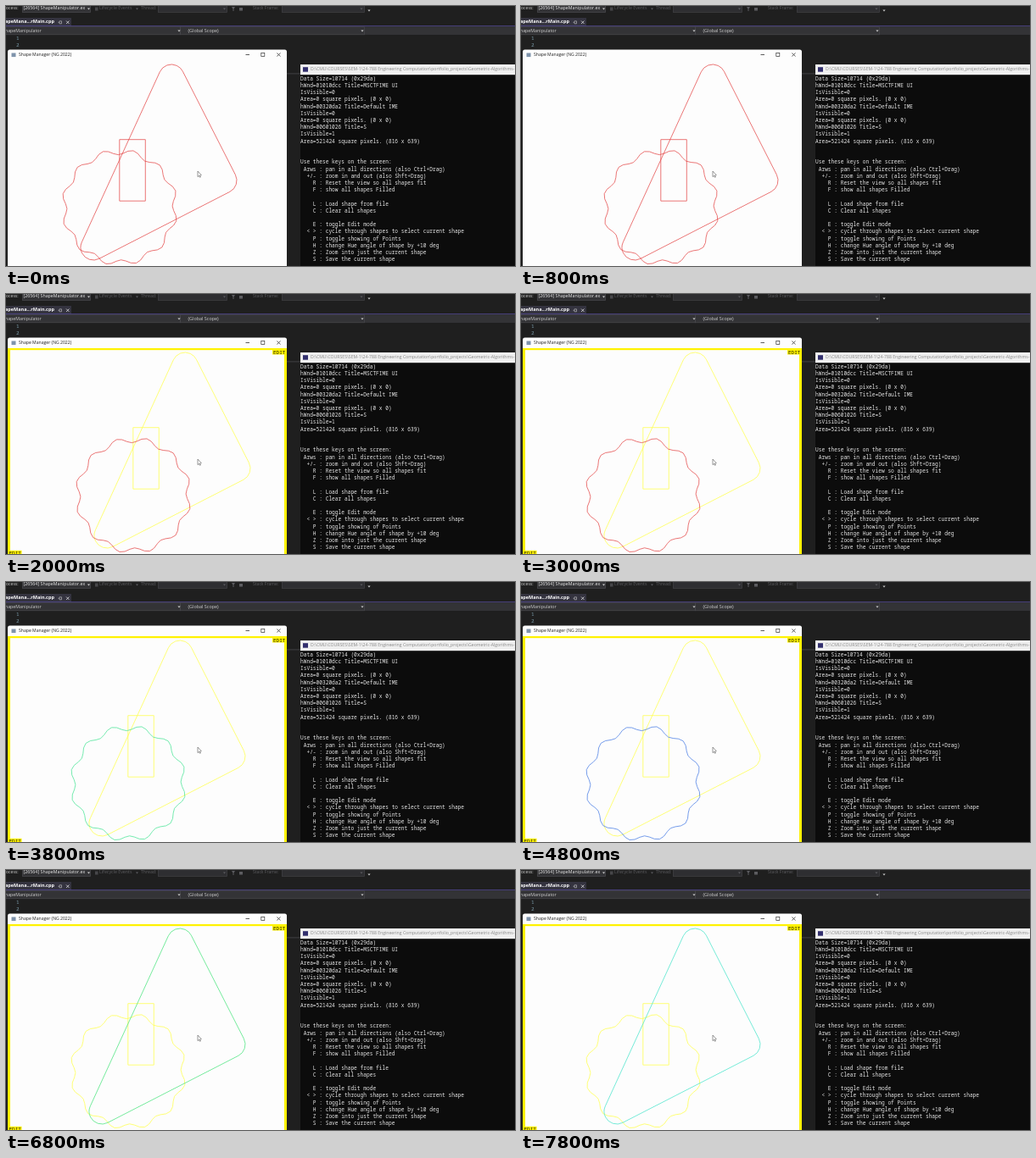
Animation, 600 px wide and 307 px high, one loop 8000 ms. Source, as an HTML page with a canvas:

```html
<!DOCTYPE html>
<html lang="en">
<head>
<meta charset="utf-8">
<title>Shape Manager</title>
<style>
html, body { margin: 0; width: 100%; height: 100%; overflow: hidden; background: #1f1f1f; }
canvas { display: block; width: 600px; height: 307px; }
</style>
</head>
<body>
<canvas id="stage" width="600" height="307"></canvas>
<script>
const LOOP = 8000, STEP = 200;
const SANS = '"Open Sans", "Noto Sans", sans-serif';
const MONO = '"Noto Sans Mono", "DejaVu Sans Mono", monospace';
const ctx = document.getElementById('stage').getContext('2d');

const consoleLines = [
  'Data Size=10714 (0x29da)',
  'hWnd=01010dcc Title=MSCTFIME UI',
  'IsVisible=0',
  'Area=0 square pixels. (0 x 0)',
  'hWnd=00320da2 Title=Default IME',
  'IsVisible=0',
  'Area=0 square pixels. (0 x 0)',
  'hWnd=00601026 Title=S',
  'IsVisible=1',
  'Area=521424 square pixels. (816 x 639)',
  '', '',
  'Use these keys on the screen:',
  ' Arws : pan in all directions (also Ctrl+Drag)',
  '  +/- : zoom in and out (also Shft+Drag)',
  '    R : Reset the view so all shapes fit',
  '    F : show all shapes Filled',
  '',
  '    L : Load shape from file',
  '    C : Clear all shapes',
  '',
  '    E : toggle Edit mode',
  '  < > : cycle through shapes to select current shape',
  '    P : toggle showing of Points',
  '    H : change Hue angle of shape by +10 deg',
  '    Z : Zoom into just the current shape',
  '    S : Save the current shape'
];

// [time, value] pairs, linear between them
const panKeys = [[0, 0], [600, 31], [800, 31], [1400, 16], [2200, 16], [2800, 10]];
const gearHueKeys = [[3000, 0], [4200, 222]];
const triHueKeys = [[5400, 0], [6600, 140], [6800, 140], [7800, 170]];
const EDIT_AT = 1200, TRIANGLE_AT = 5000;

function valueAt(keys, t) {
  if (t <= keys[0][0]) return keys[0][1];
  for (let i = 1; i < keys.length; i++) {
    const [t0, v0] = keys[i - 1], [t1, v1] = keys[i];
    if (t <= t1) return v0 + (v1 - v0) * (t - t0) / (t1 - t0);
  }
  return keys[keys.length - 1][1];
}

function box(x, y, w, h, fill) {
  ctx.fillStyle = fill;
  ctx.fillRect(x, y, w, h);
}

function frame(x, y, w, h, color) {
  ctx.strokeStyle = color;
  ctx.lineWidth = 0.7;
  ctx.strokeRect(x, y, w, h);
}

function label(text, x, y, size, color, family = SANS, weight = '') {
  ctx.font = `${weight} ${size}px ${family}`;
  ctx.fillStyle = color;
  ctx.textBaseline = 'middle';
  ctx.fillText(text, x, y);
}

function poly(points, stroke, fill, width = 0.8) {
  ctx.beginPath();
  points.forEach(([x, y]) => ctx.lineTo(x, y));
  if (fill) {
    ctx.closePath();
    ctx.fillStyle = fill;
    ctx.fill();
  }
  if (stroke) {
    ctx.strokeStyle = stroke;
    ctx.lineWidth = width;
    ctx.stroke();
  }
}

const caret = (x, y, color) => poly([[x - 1.6, y - 1], [x + 1.6, y - 1], [x, y + 1]], null, color);

function drawEditor() {
  const dim = '#5c5c60', text = '#d0d0d0';
  box(0, 0, 600, 307, '#1f1f1f');

  label('Process:', -5, 3, 5.1, text);
  box(19, -1, 81, 8.6, '#333336');
  frame(19.5, -1, 80, 8.6, '#48484c');
  label('[26564] ShapeManipulator.ex', 20.5, 3, 5.3, '#ececec');
  caret(97.5, 3.5, text);
  box(105, 1.5, 3.5, 4, '#47474a');
  label('Lifecycle Events', 110, 3, 5.3, dim);
  caret(154.5, 3.5, dim);
  label('Thread:', 159, 3, 5.2, dim);
  box(179, -1, 82, 8.6, '#2e2e31');
  frame(179.5, -1, 81, 8.6, '#404044');
  caret(257.5, 3.5, dim);
  poly([[266, 1], [270, 1], [268.5, 3.5], [268.5, 6], [267.5, 6], [267.5, 3.5]], null, dim);
  box(275, 2, 4, 3.5, dim);
  label('Stack Frame:', 291, 3, 5.1, dim);
  box(325, -1, 98, 8.6, '#2e2e31');
  frame(325.5, -1, 97, 8.6, '#404044');
  caret(419, 3.5, dim);
  caret(428, 5.5, text);

  box(0, 14, 77, 10, '#34333f');
  box(0, 23.2, 600, 1, '#51488f');
  label('apeMana...rMain.cpp', -1, 19, 5.5, '#ffffff', SANS, 'bold');
  poly([[61.5, 19.3], [63, 19.3], [63, 17.8], [65.5, 17.8], [65.5, 20.8], [63, 20.8], [63, 19.3]], '#c8c8c8', null, 0.6);
  poly([[71, 17.5], [74.5, 21]], '#dddddd');
  poly([[74.5, 17.5], [71, 21]], '#dddddd');

  box(0, 24.2, 600, 9.8, '#333336');
  frame(-1, 24.8, 206.5, 9, '#48484c');
  frame(205.5, 24.8, 217, 9, '#48484c');
  label('ShapeManipulator', -4, 29.4, 5.3, text);
  caret(204, 29.6, text);
  label('(Global Scope)', 214.5, 29.4, 5.45, text);
  caret(420, 29.6, text);
  label('1', 12, 38.5, 6, '#7d9fae', MONO);
  label('2', 12, 46.3, 6, '#7d9fae', MONO);
  box(331, 79.5, 16, 0.8, '#48484c');
}

function drawConsole() {
  box(347, 69, 253, 238, '#0c0c0c');
  box(347, 69, 253, 12.2, '#f0f0f0');
  box(350, 72.2, 6, 5.5, '#322f6e');
  label('D:\\CMU\\COURSES\\SEM-1\\24-788 Engineering Computation\\portfolio_projects\\Geometric-Algorithms-',
    359, 75.1, 5.13, '#858585');
  consoleLines.forEach((line, i) => label(line, 347, 85.9 + i * 8.22, 6.2, '#e4e4e4', MONO));
}

function drawWindow() {
  ctx.beginPath();
  ctx.roundRect(2, 51.5, 329, 260, 2.5);
  ctx.fillStyle = '#fdfdfd';
  ctx.fill();
  box(6.5, 55.5, 5, 4.6, '#7f93ab');
  label('Shape Manager (NG 2022)', 15, 57.8, 5.12, '#202020');
  poly([[282.5, 57.5], [287, 57.5]], '#333333');
  frame(300.8, 55.5, 4, 4, '#333333');
  poly([[319.5, 55.5], [323.5, 59.5]], '#333333');
  poly([[323.5, 55.5], [319.5, 59.5]], '#333333');
}

function outline(color, build) {
  ctx.beginPath();
  build();
  ctx.closePath();
  ctx.strokeStyle = color;
  ctx.lineWidth = 0.75;
  ctx.stroke();
}

function gearPath() {
  const n = 72, phase = 13.5 * Math.PI / 180;
  for (let i = 0; i < n; i++) {
    const a = i / n * 2 * Math.PI;
    const r = 65.4 + 3.3 * Math.cos(12 * a);
    ctx.lineTo(134 + r * Math.cos(a + phase), 237.7 + r * Math.sin(a + phase));
  }
}

function trianglePath() {
  const c = [[195, 84], [257, 206], [103, 285]];
  const normal = (p, q) => Math.atan2(q[1] - p[1], q[0] - p[0]) - Math.PI / 2;
  c.forEach((p, i) => {
    const prev = c[(i + 2) % 3], next = c[(i + 1) % 3];
    ctx.arc(p[0], p[1], 15, normal(prev, p), normal(p, next));
  });
}

function drawEditFrame() {
  const yellow = '#fff200';
  box(2, 64, 329, 2.2, yellow);
  box(2, 64, 3, 243, yellow);
  box(328, 64, 3, 243, yellow);
  box(314, 65, 16, 6.5, yellow);
  box(3, 302.8, 15.5, 5, yellow);
  label('EDIT', 315, 69, 6, '#222200', MONO);
  label('EDIT', 3.5, 306.6, 6, '#222200', MONO);
}

function drawShapes(t) {
  const edit = t >= EDIT_AT, triangleActive = t >= TRIANGLE_AT;
  const hue = keys => `hsl(${Math.round(valueAt(keys, t) / 10) * 10}, 75%, 59%)`;
  const idle = edit ? '#ffff4a' : hue(gearHueKeys);
  const gear = edit && triangleActive ? idle : hue(gearHueKeys);
  const triangle = edit && !triangleActive ? idle : hue(triHueKeys);

  ctx.save();
  ctx.beginPath();
  ctx.rect(2, 64, 329, 243);
  ctx.clip();
  ctx.translate(valueAt(panKeys, t), 0);
  outline(idle, () => ctx.rect(133.8, 157.7, 30.5, 72.5));
  if (triangleActive) outline(gear, gearPath);
  outline(triangle, trianglePath);
  if (!triangleActive) outline(gear, gearPath);
  ctx.restore();

  if (edit) drawEditFrame();
}

function drawPointer() {
  poly([[226, 195], [226, 201.6], [227.5, 200.4], [228.6, 202.4], [229.4, 202],
    [228.5, 200], [230.3, 199.7], [226, 195]], '#555555', '#ffffff', 0.6);
}

function draw() {
  const t = Math.floor(((performance.now() - start) % LOOP) / STEP) * STEP;
  drawEditor();
  drawConsole();
  drawWindow();
  drawShapes(t);
  drawPointer();
  requestAnimationFrame(draw);
}

const start = performance.now();
draw();
</script>
</body>
</html>
```
